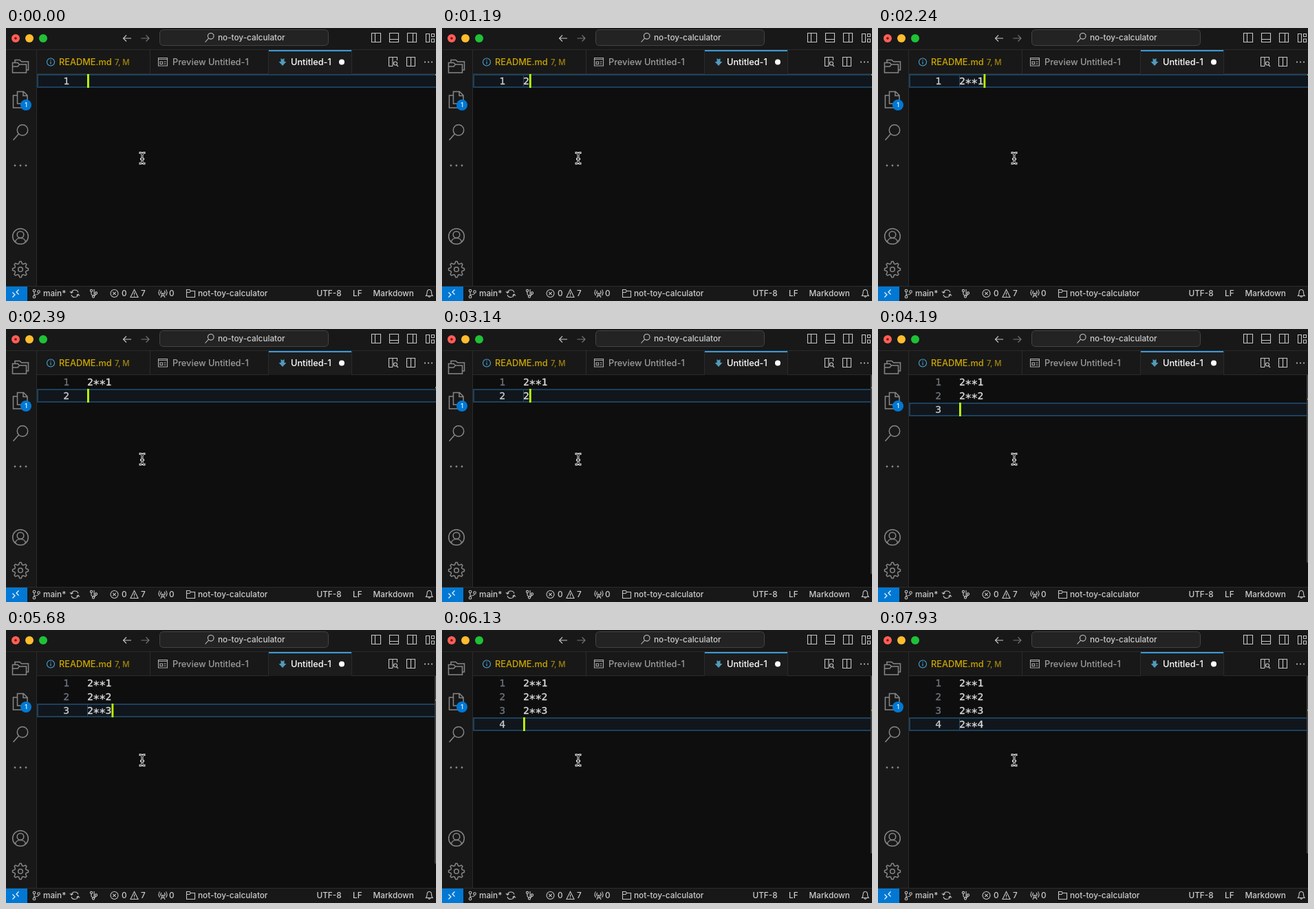
These frames come from a looping animation (625 by 397 pixels, 8000 ms). An HTML page:

```html
<!DOCTYPE html>
<html lang="en">
<head>
<meta charset="utf-8">
<title>Editor typing</title>
<style>
  html, body { margin: 0; width: 100%; height: 100%; overflow: hidden; background: #0e0e0e; }
  svg { display: block; }
  text { font: 500 11.75px Inter, sans-serif; fill: #ccc; white-space: pre; }
  .tab { font-size: 12.75px; }
  #code text { font: 14.73px "DejaVu Sans Mono", monospace; fill: #dcdcdc; stroke: #dcdcdc; stroke-width: 0.3; }
  #code .star { font-size: 16.5px; }
  #code .number { fill: #6e7681; stroke: #6e7681; text-anchor: end; }
  #code .current { fill: #ccc; stroke: #ccc; }
  .icon { fill: none; stroke: #c5c5c5; stroke-width: 1.1; }
  .side { stroke: #868686; stroke-width: 1.5; }
</style>
</head>
<body>
<svg width="625" height="397" viewBox="0 0 625 397">
  <!-- window areas -->
  <path fill="#181818" d="M0 0H625V67H45V375H625V397H0Z"/>
  <path fill="#1c1c1c" d="M382 32H502V67H382Z"/>
  <path fill="none" stroke="#2b2b2b" d="M0 31.5H625M44.5 32V375M0 375.5H625M45 66.5H382M502 66.5H625M209.5 32V66M381.5 32V66M502.5 32V66"/>
  <path fill="#3b9bd9" d="M382 32H502V34H382Z"/>

  <!-- title bar -->
  <circle cx="14" cy="15" r="6" fill="#fe5f57"/>
  <circle cx="14" cy="15" r="1.8" fill="#7c0e08"/>
  <circle cx="34" cy="15" r="6" fill="#febc2e"/>
  <circle cx="54" cy="15" r="6" fill="#1fc137"/>
  <rect x="223.5" y="2.5" width="245" height="23" rx="5" fill="#232323" stroke="#444"/>
  <g class="icon">
    <path d="M182 15H170.5M175 10.500L170.500 15L175 19.500"/>
    <path stroke="#777" d="M196.500 15H208M203.500 10.500L208 15L203.500 19.500"/>
    <circle cx="297.700" cy="11.800" r="4.300"/>
    <path d="M294.500 15L289.500 20.500"/>
    <path d="M531.500 7.500h13v13h-13zM536.500 7.500v13M557.500 7.500h13v13h-13zM557.500 16.500h13M583.500 7.500h13v13h-13zM591.500 7.500v13"/>
    <path d="M610.500 8.500h5v12h-5zM618.500 8.500h4v4h-4zM618.500 16h4v4.500h-4z"/>
  </g>
  <text x="308" y="18.300">no-toy-calculator</text>

  <!-- tabs -->
  <g class="icon">
    <g stroke="#4aa5d8"><circle cx="65" cy="49.500" r="5.500"/><path d="M65 48.500V52.500M65 46V47.300"/></g>
    <path stroke="#aaa" d="M221.500 43.500h13v11.500h-13zM221.500 45.500h13M224 49h3.500v3.500h-3.500zM229.500 49h3M229.500 52h3"/>
    <path d="M562 55.500H556.500V42.500H568.500V47M562 42.500V55.500"/>
    <circle cx="566" cy="51.500" r="2.500"/>
    <path d="M567.500 53.500L570 56M582.500 42.500h12v13h-12zM588.500 42.500v13"/>
  </g>
  <text class="tab" x="77" y="54" style="fill:#cca700">README.md</text>
  <text x="158" y="54" style="fill:#a1850c;font-size:11.300px">7, M</text>
  <text class="tab" x="242" y="54" style="fill:#9d9d9d">Preview Untitled-1</text>
  <path fill="#519aba" d="M399.500 44l2.500 1.500l2.500-1.500v5h3l-5.500 6l-5.500-6h3z"/>
  <text class="tab" x="414" y="54" style="fill:#fff">Untitled-1</text>
  <circle cx="488" cy="49.500" r="4" fill="#fff"/>
  <path fill="none" stroke="#ccc" stroke-width="2" stroke-linecap="round" stroke-dasharray="0 5" d="M609 49.500H620"/>

  <!-- activity bar -->
  <g class="icon side">
    <path d="M13 50V46.500H20L22.500 49H32.500V61H30M9.500 65V50.500H17L19.500 53H29.500V65ZM9.500 56H17L19.500 53"/>
    <path d="M16.500 92.500H25.500L31 98V110H16.500ZM25 92.500V98.500H31M16.500 98H10.500V116H24V110"/>
    <circle cx="24" cy="148.500" r="7.700"/><path d="M18.500 154L10.500 163"/>
    <circle cx="21" cy="303" r="11.300"/><circle cx="21" cy="300.500" r="4.800"/>
    <path d="M13.500 311.500C14 303.500 28 303.500 28.500 311.500"/>
    <path id="gear"/><circle cx="21" cy="351" r="3.300"/>
    <path stroke-width="2.800" stroke-linecap="round" stroke-dasharray="0 8" d="M13 200H30"/>
  </g>
  <circle cx="29" cy="112" r="8" fill="#0078d4"/>
  <text x="29" y="115.300" text-anchor="middle" style="font-size:9px;fill:#fff">1</text>

  <!-- status bar -->
  <path fill="#0078d4" d="M0 376H31V397H0Z"/>
  <g class="icon">
    <path stroke="#fff" d="M9.500 384.500L13 388L9.500 391.500M18.500 380.500L15 384L18.500 387.500"/>
    <circle cx="41" cy="382" r="1.800"/><circle cx="41" cy="391" r="1.800"/><circle cx="47.500" cy="383.500" r="1.800"/>
    <path d="M41 384V389M47.500 385.500Q47 388 41 388"/>
    <path d="M95 385A5.200 5.200 0 0 1 105 384.500M105 387.500A5.200 5.200 0 0 1 95 388M93 383L95 385.500L97.500 383.500M107 389.500L105 387L102.500 389"/>
    <circle cx="124" cy="382" r="1.600"/><circle cx="127" cy="390.500" r="1.600"/><circle cx="131" cy="385.500" r="1.600"/>
    <path d="M124 383.500V387L126 389.500M128 380V389M131 387L128.500 389.500"/>
    <circle cx="157.500" cy="386" r="5.500"/><path d="M155.300 383.800L159.700 388.200M159.700 383.800L155.300 388.200"/>
    <path d="M186.500 380.500L192 391.500H181ZM186.500 384.500V388M186.500 389V390.200"/>
    <path d="M228 385L225 392M228 385L231 392M226 389.500H230M225.800 387Q223.800 384.500 225.800 382M230.200 387Q232.200 384.500 230.200 382M223.500 389Q220.500 384.500 223.500 380.500M232.500 389Q235.500 384.500 232.500 380.500"/>
    <path d="M262.500 391.500V380.500H267L268.500 382.500H274.500V391.500ZM262.500 384.500H267L268.500 382.500"/>
    <path d="M610.500 389.500Q612 388 612 385Q612 380.500 615.300 380.500Q618.500 380.500 618.500 385Q618.500 388 620 389.500ZM613.800 390Q615.300 393 616.800 390"/>
  </g>
  <text x="54" y="390.300">main*</text>
  <text x="168" y="390.300">0</text>
  <text x="196" y="390.300">7</text>
  <text x="237" y="390.300">0</text>
  <text x="279" y="390.300">not-toy-calculator</text>
  <text x="451.500" y="390.300">UTF-8</text>
  <text x="504" y="390.300">LF</text>
  <text x="533.500" y="390.300">Markdown</text>

  <!-- editor -->
  <g id="code"></g>
  <defs>
    <path id="beam" fill="none" stroke-linecap="square" d="M195 181.500Q198 181.500 198 184V194.500Q198 197 195 197M201 181.500Q198 181.500 198 184M198 194.500Q198 197 201 197M196.500 190.500H199.500"/>
  </defs>
  <use href="#beam" stroke="#eee" stroke-width="2.900"/>
  <use href="#beam" stroke="#111" stroke-width="1"/>
</svg>
<script>
const DURATION = 8000, TOP = 67, LINE = 20, VIEW = 308, CHAR = 8.87;
const SCROLLBAR_AT = 2540;

// "|" blinks the cursor; everything else is typed
const keys = [
  [300, "|"], [900, "|"], [1190, "2"], [1790, "*"], [1940, "*"], [2240, "1"], [2390, "\n"],
  [2990, "|"], [3140, "2"], [3590, "*"], [3740, "*"], [3890, "2"], [4190, "\n"],
  [4640, "|"], [4790, "2"], [5230, "**"], [5680, "3"], [6130, "\n"],
  [6580, "2"], [7030, "*"], [7180, "*"], [7480, "4"], [7930, "|"],
];

const code = document.getElementById("code");
const rect = (x, y, w, h, fill, extra = "") =>
  `<rect x="${x}" y="${y}" width="${w}" height="${h}" fill="${fill}" ${extra}/>`;

function gearPath() {
  const points = Array.from({ length: 32 }, (_, i) => {
    const angle = (i - 0.5) * Math.PI / 16, radius = i % 4 < 2 ? 11.5 : 8.5;
    return `${21 + radius * Math.cos(angle)} ${351 + radius * Math.sin(angle)}`;
  });
  return `M${points.join("L")}Z`;
}

function stateAt(time) {
  let text = "", cursor = true;
  for (const [at, key] of keys) {
    if (at > time) break;
    cursor = key === "|" ? !cursor : true;
    if (key !== "|") text += key;
  }
  return { lines: text.split("\n"), cursor };
}

// asterisks are larger and sit at mid height
function drawGlyph(char, column, baseline) {
  const x = 118 + CHAR * column;
  return char === "*"
    ? `<text class="star" x="${x - 0.5}" y="${baseline + 3.6}">*</text>`
    : `<text x="${x}" y="${baseline}">${char}</text>`;
}

function drawLine(line, i, current) {
  const baseline = TOP + LINE * i + 15;
  const glyphs = [...line].map((char, column) => drawGlyph(char, column, baseline)).join("");
  return `<text class="number ${current ? "current" : ""}" x="92" y="${baseline}">${i + 1}</text>${glyphs}`;
}

function render(time) {
  const { lines, cursor } = stateAt(time);
  const last = lines.length - 1, typed = lines[last].length, y = TOP + LINE * last;
  const scale = VIEW / (VIEW + LINE * last);
  let svg = rect(46, y + 1, 582, LINE - 2, "#10161c", 'stroke="#1e405c" stroke-width="2"');
  if (typed) svg += rect(118, y + 2, 1, LINE - 4, "#29485e");
  svg += lines.map((line, i) => drawLine(line, i, i === last)).join("");
  if (cursor) svg += rect(118 + CHAR * typed, y, 2.8, LINE, "#bfff00");
  if (time >= SCROLLBAR_AT) svg += rect(623, TOP, 2, VIEW * scale, "#434343");
  svg += rect(624, Math.max(TOP, TOP + LINE * last * scale - 1.5), 1, 2, "#a5b52a");
  code.innerHTML = svg;
}

let shown = "";
function tick() {
  const time = performance.now() % DURATION;
  const step = keys.filter(([at]) => at <= time).length + (time >= SCROLLBAR_AT ? "s" : "");
  if (step !== shown) render(time);
  shown = step;
  requestAnimationFrame(tick);
}

document.getElementById("gear").setAttribute("d", gearPath());
tick();
</script>
</body>
</html>
```
